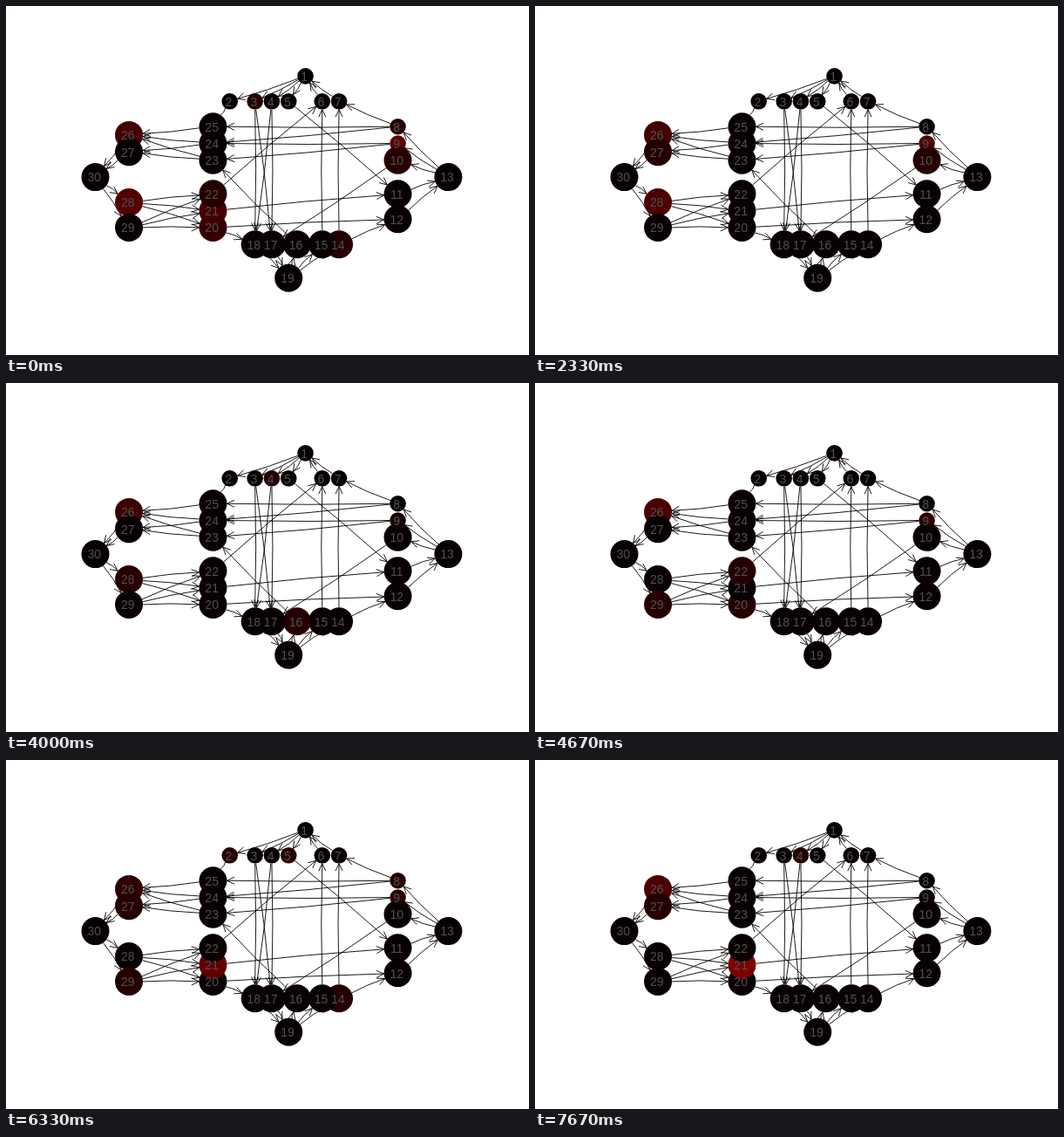
Write an HTML page that moves like this. It is 600 px wide and 400 px high and loops after 8 s.

```html
<!DOCTYPE html>
<html>
<head>
<meta charset="utf-8">
<style>
html, body { margin: 0; width: 100%; height: 100%; overflow: hidden; background: #fff; }
svg { display: block; width: 600px; height: 400px; }
path { fill: none; stroke: #000; stroke-width: 0.9; }
text { font: 14px "Liberation Sans", Arial, sans-serif; fill: #505050; text-anchor: middle; }
</style>
</head>
<body>
<svg id="stage" viewBox="0 0 600 400"></svg>
<script>
const LOOP = 8000, GRID = 9.64;
const stage = document.getElementById('stage');

// Layers clockwise from the top, in grid cells: [column(s), row(s)]
const layers = [
  [25, 0], [[16, 19, 21, 23, 27, 29], 3], [36, [6, 8, 10, 14, 17]], [42, 12],
  [[29, 27, 24, 21, 19], 20], [23, 24], [14, [18, 16, 14, 10, 8, 6]],
  [4, [7, 9, 15, 18]], [0, 12]
];
const nodes = layers.flatMap(([cols, rows]) => {
  const count = cols.length || rows.length || 1;
  return Array.from({ length: count }, (_, i) => ({
    x: 102.5 + GRID * (cols[i] ?? cols),
    y: 80.4 + GRID * (rows[i] ?? rows)
  }));
});
nodes.forEach((n, i) => n.r = i < 9 ? 9.3 : 16);

const links = {
  1: [2, 3, 4, 5], 2: [25], 3: [17, 18], 4: [17, 18], 5: [11], 6: [1], 7: [1],
  8: [7, 24, 25], 9: [23, 24], 10: [17], 11: [13], 12: [13], 13: [8, 9, 10],
  14: [7, 12], 15: [6], 16: [23], 17: [19], 18: [19], 19: [14, 15, 16],
  20: [12, 18], 21: [11], 22: [6], 23: [26, 27], 24: [26, 27], 25: [26],
  26: [30], 27: [30], 28: [20, 21, 22], 29: [20, 21, 22], 30: [28, 29]
};

// Slow glows: [step, level] key points
const swells = {
  9: [[0, 6], [3, 3], [7, 5], [10, 0], [14, 2.5], [19, 2.5], [23, 0]],
  20: [[0, 3], [3, 4], [6, 0]],
  21: [[0, 4], [3, 2], [5, 0], [14, 0], [19, 6], [23, 8]],
  26: [[0, 4], [7, 4], [10, 2.5], [14, 4.5], [19, 2.5], [23, 4.5]],
  28: [[0, 5], [7, 4.5], [10, 4], [14, 0]]
};

// Short faint glows: the steps at which a node is lit
const blinks = {
  2: [17, 19], 3: [0, 2, 3, 11], 4: [8, 12, 23], 5: [3, 16, 18, 19],
  8: [0, 16, 19], 10: [0, 1, 7, 18, 21], 14: [0, 1, 4, 5, 8, 10, 13, 15, 18, 19, 21],
  16: [12], 20: [10, 14, 17], 22: [0, 1, 14], 27: [7, 19, 23], 29: [10, 14, 18, 19]
};

function levelAt(id, step) {
  if (blinks[id]?.includes(step)) return 2;
  const keys = swells[id] || [[0, 0]];
  const next = keys.findIndex(([at]) => at > step);
  if (next < 0) return keys[keys.length - 1][1];
  const [t0, v0] = keys[next - 1], [t1, v1] = keys[next];
  return v0 + (v1 - v0) * (step - t0) / (t1 - t0);
}

function add(tag, attrs, text) {
  const el = document.createElementNS('http://www.w3.org/2000/svg', tag);
  for (const k in attrs) el.setAttribute(k, attrs[k]);
  if (text) el.textContent = text;
  return stage.appendChild(el);
}

// Slightly bowed arrow between the rims of two nodes
function drawLink(a, b) {
  const angle = Math.atan2(b.y - a.y, b.x - a.x);
  const move = (p, d, turn = 0) =>
    ({ x: p.x + d * Math.cos(angle + turn), y: p.y + d * Math.sin(angle + turn) });
  const xy = p => `${p.x} ${p.y}`;
  const start = move(a, a.r), tip = move(b, -b.r);
  const mid = { x: (start.x + tip.x) / 2, y: (start.y + tip.y) / 2 };
  let d = `M${xy(start)}Q${xy(move(mid, 2, -Math.PI / 2))} ${xy(tip)}`;
  // Very short links have no room for a head
  if (Math.hypot(tip.x - start.x, tip.y - start.y) > 11 || a.r === b.r)
    d += `M${xy(move(tip, -9.5, 0.44))}L${xy(tip)}L${xy(move(tip, -9.5, -0.44))}`;
  add('path', { d });
}

for (const from in links)
  for (const to of links[from]) drawLink(nodes[from - 1], nodes[to - 1]);

const discs = nodes.map(n => add('circle', { cx: n.x, cy: n.y, r: n.r }));
nodes.forEach((n, i) => add('text', { x: n.x - 1.3, y: n.y + 5.4 }, String(i + 1)));

function frame(now) {
  const t = now % LOOP;
  const step = Math.floor((Math.floor(t / 10) * 3 + 1) / 100);
  discs.forEach((disc, i) =>
    disc.setAttribute('fill', `rgb(${8 + 15 * levelAt(i + 1, step)},0,1)`));
  requestAnimationFrame(frame);
}
frame(0);
</script>
</body>
</html>
```
